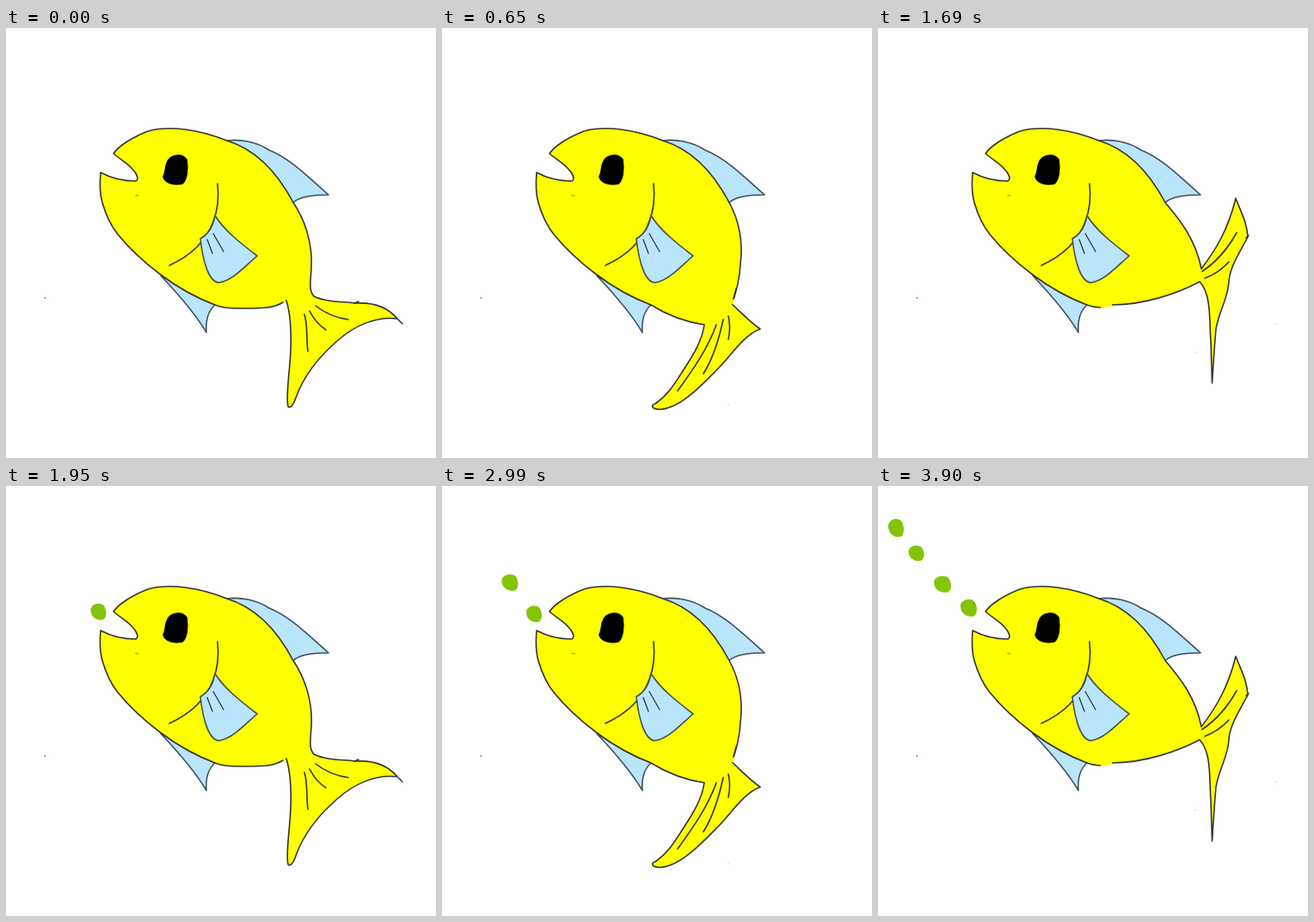
An HTML page that plays this animation: 500x500 px, repeating every 4550 ms.

```html
<!DOCTYPE html>
<html>
<head>
<meta charset="utf-8">
<style>
html, body { margin: 0; width: 100%; height: 100%; overflow: hidden; background: #fff; }
svg { display: block; width: 100vw; height: 100vh; }
path { stroke: #333; stroke-width: 1.6; stroke-linecap: round; stroke-linejoin: round; fill: none; }
.fin { fill: #b9e5fd; stroke: #40505a; }
#body { fill: #ff0; }
#gap { stroke: #ff0; stroke-width: 2.5; stroke-linecap: butt; }
#eye { fill: #000; stroke: #000; }
#pellets path { fill: #84c408; stroke: none; }
#specks { fill: #bbb; }
</style>
</head>
<body>
<svg viewBox="0 0 500 500">
  <path class="fin" d="M257 131C272 129 291 132 306 142C331 152 351 173 375 194C360 194 342 195 334 203Z"/>
  <path class="fin" d="M180 288C199 308 220 332 233 354C232 340 235 329 243 322Z"/>
  <path id="body"/>
  <path id="gap"/>
  <path id="rays"/>
  <path d="M246 181C248 200 245 215 241 225C232 250 212 266 190 276"/>
  <path class="fin" d="M243 218C253 235 275 252 292 265C278 277 263 294 248 296C236 296 229 272 226 245C235 240 241 230 243 218Z"/>
  <path d="M234 246L240 262M241 239L253 260" style="stroke-width:1.3"/>
  <path id="eye" d="M187 157C191 146 205 146 210 153C212 165 210 177 205 181C197 183 185 181 183 173C186 167 185 162 187 157Z"/>
  <path d="M151 194.500L154 195" style="stroke:#b5ac00"/>
  <circle cx="45.500" cy="314" r=".9" fill="#777"/>
  <g id="specks"></g>
  <g id="pellets"></g>
</svg>
<script>
const STEP = 650;
const $ = id => document.getElementById(id);

const head = 'M243 322C222 314 200 302 180 287C160 272 143 256 130 240C122 230 116 217 112 203C109 193 109 180 110 168' +
  'C121 174 136 178 151 178C155 176 152 169 147 164C141 157 133 153 125 146' +
  'C131 137 147 127 165 120C190 113 225 118 257 131C290 141 315 167 334 203';

const wide = {
  rear: 'C347 222 357 250 355 280C354 296 352 305 358 312C372 319 392 318 408 320C428 319 444 325 455 338' +
    'L461 344L455 338C430 335 405 346 385 364C363 383 346 405 337 430C334 439 330 443 328 440' +
    'C325 428 330 400 331 375C332 350 330 330 326 317L322 319C310 327 290 326 270 326C258 326 250 325 243 322Z',
  gap: 'M322.500 319L325 317.500',
  rays: 'M347 333C351 345 349 360 351 376M353 329Q360 343 372 351M360 323C370 331 383 337 398 339M405 320L410 318',
  specks: []
};
const inward = {
  rear: 'C346 225 350 250 347 275C346 293 343 305 337 321C348 331 358 342 370 350C352 356 335 382 322 395' +
    'C305 412 285 434 265 441C257 444 250 444 246 442C243 439 246 437 248 437' +
    'C262 427 269 416 278 402C288 386 302 367 305 345C285 342 262 334 243 322Z',
  gap: 'M340 315L336 321',
  rays: 'M327 339C322 362 316 383 304 402M319 345C309 373 292 397 274 422M333 335Q336 348 333 362M339 315L342 303',
  specks: [[333, 438]]
};
const upward = {
  rear: 'C349 221 369 244 376 280C392 259 407 235 416 198C421 212 429 225 430 243C420 262 409 278 408 295' +
    'C407 315 396 330 393 350C391 372 390 390 388.500 413L387 365C385 340 388 310 374 295' +
    'C350 308 310 322 272 322L258 325C252 325 248 324 243 322Z',
  gap: 'M259 325L272 322',
  rays: 'M377 283Q401 267 417 238M380 291Q396 285 408 272M428 244L431 241',
  specks: [[463, 344], [369, 377]]
};

// Pellets are [x, y, rx, ry], nearest to the mouth first
const scenes = [
  { pose: wide, pellets: [] },
  { pose: inward, pellets: [] },
  { pose: upward, pellets: [] },
  { pose: wide, pellets: [[107.500, 146, 9, 10]] },
  { pose: inward, pellets: [[107, 148.500, 9, 10], [79, 112, 9.500, 10]] },
  { pose: wide, pellets: [[106, 138, 9, 11], [74.500, 98, 9.500, 10.500], [47, 62.500, 9, 10.500]] },
  { pose: upward, pellets: [[105.500, 141.500, 9.500, 10.500], [75, 114, 10, 10], [44.500, 78, 9, 9.500], [21, 48.500, 9, 11]] }
];

const blob = ([x, y, rx, ry]) => `<path transform="translate(${x} ${y}) scale(${rx} ${ry})"
  d="M-1 -.3C-.8 -1 .3 -1.100 .7 -.7C1.100 -.1 1.100 .5 .7 .9C.1 1.150 -.6 .8 -.85 .4Q-1.050 0 -1 -.3Z"/>`;
const speck = ([x, y]) => `<circle cx="${x}" cy="${y}" r=".7"/>`;

let shown;
function draw(now) {
  const scene = scenes[Math.floor(now / STEP) % scenes.length];
  if (scene !== shown) {
    shown = scene;
    const { pose, pellets } = scene;
    $('body').setAttribute('d', head + pose.rear);
    $('gap').setAttribute('d', pose.gap);
    $('rays').setAttribute('d', pose.rays);
    $('specks').innerHTML = pose.specks.map(speck).join('');
    $('pellets').innerHTML = pellets.map(blob).join('');
  }
  requestAnimationFrame(draw);
}
draw(performance.now());
</script>
</body>
</html>
```
